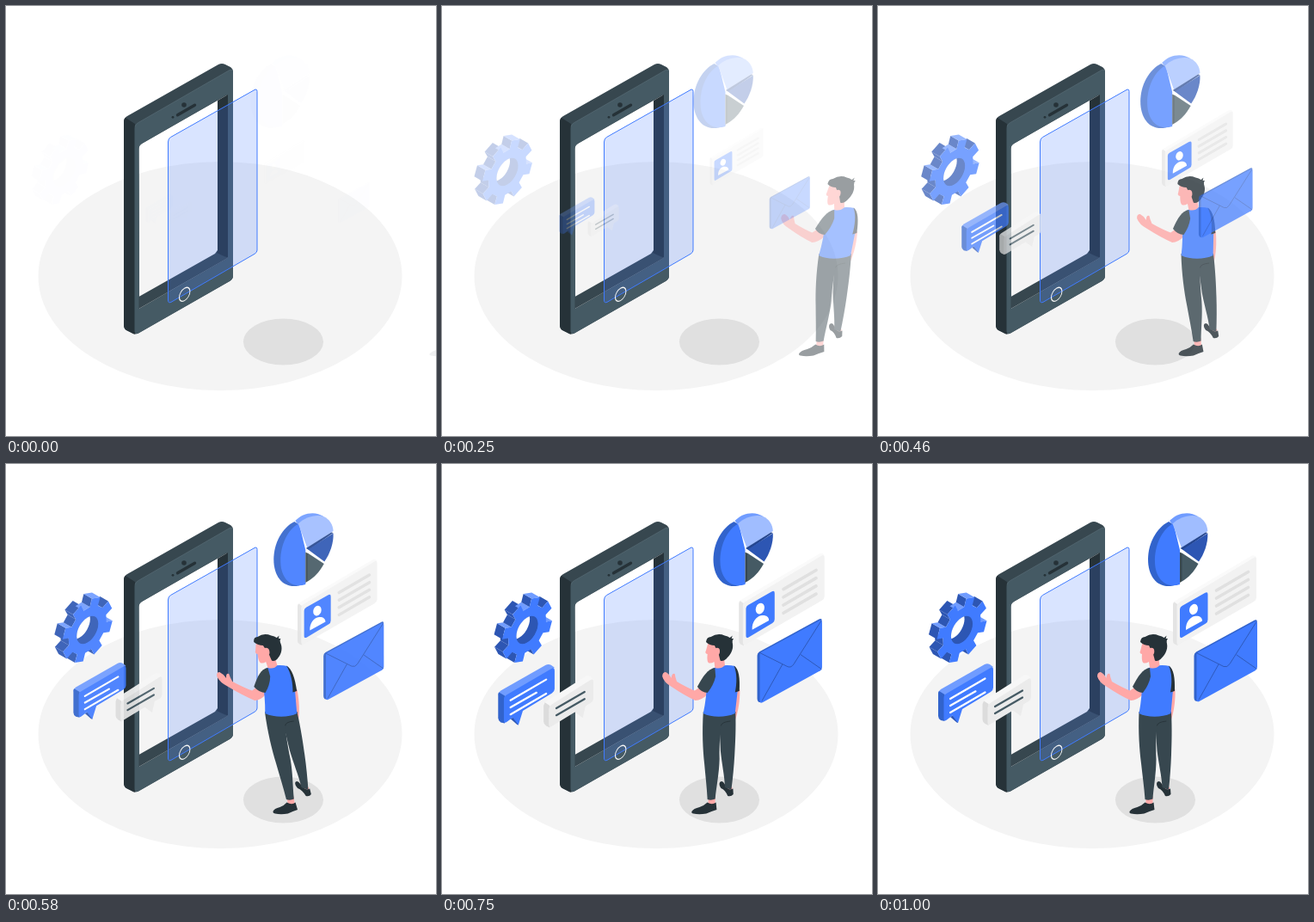
An HTML page that plays this animation: 500x500 px, repeating every 1.04 s.

```html
<!DOCTYPE html>
<html lang="en">
<head>
<meta charset="utf-8">
<title>Phone app scene</title>
<style>
  html, body { margin: 0; height: 100%; overflow: hidden; background: #fff; }
  svg { display: block; width: 100%; height: 100%; }
  .blue { fill: #407bff; }
  .shade { fill: #3163cc; }
  .navy { fill: #2d56b3; }
  .light { fill: #709cff; }
  .ink { fill: #263238; }
  .slate { fill: #37474f; }
  .steel { fill: #455a64; }
  .skin { fill: #ffa8a7; }
  .white { fill: #fff; }
  .line { fill: none; stroke-linecap: round; stroke-linejoin: round; }
</style>
</head>
<body>
<svg viewBox="0 0 500 500">
  <defs>
    <clipPath id="bore"><circle r="14.5" transform="matrix(.866 -.5 0 1 97.5 193)"/></clipPath>
  </defs>

  <ellipse cx="249" cy="314" rx="211.5" ry="133" fill="#f4f4f4"/>
  <ellipse cx="322.5" cy="390.5" rx="46.5" ry="27" fill="#e0e0e0"/>

  <!-- phone -->
  <g fill-rule="evenodd">
    <path class="slate" d="M137 135Q137 130 141 128L247 68Q251 66 255 68L261 71Q264 73 264 77V314Q264 317.500 260 320L154 380.500Q150 382.500 147 380.500L140 377Q137 375 137 371ZM154.500 166Q154.500 162 158 160L258 103V293L155 352Z"/>
    <path class="ink" d="M137 135Q137 131 139 130L150 137V381.500Q148 381.500 147 380.500L140 377Q137 375 137 371Z"/>
    <path class="steel" d="M149.500 143Q149.500 138 154 135.500L260 74.500Q264 72.500 264 77V314Q264 317.500 260 320L154 380.500Q149.500 382.500 149.500 377ZM154.500 166Q154.500 162 158 160L255 104Q258 102 258 106V293L155 352Z"/>
  </g>
  <path class="line" d="M150 140Q151 137 154 135.500L260 74.500L263 74" stroke="#5b6f79" stroke-width=".6"/>
  <path class="slate" d="M154.500 338L243 288L246 284L258 293L154.500 352Z"/>
  <path class="ink" d="M246 110L258 103V293L245 287Q246 286 246 284Z"/>
  <circle class="ink" cx="207" cy="115" r="2.8"/>
  <circle class="ink" cx="194" cy="129.300" r="1.4"/>
  <path class="line" d="M199.500 126.800L219.500 115.200" stroke="#263238" stroke-width="3.4"/>
  <path d="M188.500 158Q188.500 154.500 191.500 152.500L289 97.500Q292 96 292 99.500V284Q292 286.500 289 288.300L192 344.300Q188.500 346 188.500 342Z" fill="#407bff" fill-opacity=".2" stroke="#407bff"/>
  <circle class="line" r="7.200" transform="matrix(.866 -.5 0 1 207.700 335.300)" stroke="#f5f5f5" stroke-width="1.200"/>

  <!-- chat bubbles and contact card -->
  <g id="panels">
    <path class="light" d="M70 267Q70 264 73 262L124 233Q127 231.500 130 233L134 236L77 270Z"/>
    <path class="shade" d="M70 267Q70 265 71 264L77.500 268V299L73 298Q70 296 70 293Z"/>
    <path class="navy" d="M84 294L91.500 300.500L93 301L92 290Z"/>
    <path class="blue" d="M76.500 272Q76.500 268.500 79.500 267L130 237.500Q134 235 134 239V260Q134 263 131 265L98 285L93 301L86.500 292.500L80 297.500Q76.500 300 76.500 296Z"/>
    <path class="line" d="M84 273L124.500 249.500M84 281L113.500 264.300M84 289L124.500 265.500" stroke="#fff" stroke-width="2.200"/>

    <path fill="#f7f7f7" d="M121.500 279Q121.500 276 124 274.500L169 246Q172 244 175 246L178 249L128 282Z"/>
    <path fill="#dcdcdc" d="M121.500 279L123 275.500L128.500 279V304L124.500 302Q121.500 300 121.500 297Z"/>
    <path fill="#ebebeb" d="M127.500 283Q127.500 280 130.500 278L174.500 250Q178 248 178 252V271Q178 274 175 276L169 279.500L166 293L157 286.500L131.500 302Q127.500 305 127.500 301Z"/>
    <path class="line" d="M136 282L168 263.500M136 290L168 271.500" stroke="#455a64" stroke-width="2.200"/>

    <path fill="#e4e4e4" d="M343 163Q343 161 345 160L348.500 162V211L345 209.500Q343 208 343 206Z"/>
    <path fill="#fafafa" d="M344 160L434 107Q437 105 440 108L348 163Z"/>
    <path fill="#f2f2f2" d="M347.500 165Q347.500 163 349.500 161.500L437 109Q440 107 440 111V155Q440 158 437 160L351 209.500Q347.500 211 347.500 208Z"/>
    <path class="blue" d="M351 169Q351 166.500 353.500 165L380 150Q383.500 148 383.500 151.500V181Q383.500 184 381 185.500L354 201.500Q351 203 351 200Z"/>
    <ellipse class="white" rx="4.800" ry="6.300" transform="translate(367 169) rotate(20)"/>
    <path class="white" d="M358 193C357.500 184 363 178 368 177C373 176 377 178 377 182.500Z"/>
    <path class="line" d="M393.500 147L430.500 125.500M393.500 156L430.500 134.500M393.500 165L430.500 143.500M393.500 174L430.500 152.500" stroke="#e0e0e0" stroke-width="3.600"/>
  </g>

  <!-- pie chart -->
  <g id="pie">
    <path class="shade" d="M338 67C324 74 314 92 314 111C314 132 326 145 343 141.500L351 139L343 70Z"/>
    <path class="blue" d="M343.500 69C330 76 321.500 95 322 114C322.500 135 336 145 351 140V100Z"/>
    <path class="light" d="M339 66C347 57 362 54 372 61L360 66L342 70Z"/>
    <path fill="#a0bdff" d="M342.500 69.500C350 62 363 58 372 61C379 64 383 71 383.300 78L353 97.500Z"/>
    <path fill="#244690" d="M351.500 98L381 79.500L383.300 80L355 100Z"/>
    <path class="navy" d="M354 99.500L383.300 80.500C384 92 379 105 373 113.500Z"/>
    <path class="slate" d="M351 102.500L354 104V136L351 138Z"/>
    <path class="steel" d="M353.500 103.500L372.500 116C367 126 361 132 353.500 136.500Z"/>
  </g>

  <g id="gear">
    <g id="teeth"></g>
    <g clip-path="url(#bore)">
      <circle class="navy" r="15" transform="matrix(.866 -.5 0 1 97.5 193)"/>
      <circle class="white" r="14.500" transform="matrix(.866 -.5 0 1 88 187.5)"/>
    </g>
  </g>

  <g id="man">
    <path class="skin" d="M340 262L345.500 262C346 275 344 288 341 297L338 294Z"/>
    <path class="skin" d="M328 372L334 373L339 376L339 381L332 381Z"/>
    <path class="ink" d="M324.500 370Q327.500 367 330 372Q333 378 337 378.500L340 377.500L340.500 384Q338 387 334 386Q331 379 326 377Q323 373 324.500 370Z"/>
    <path class="slate" d="M322 295L341 288C342 308 341.500 325 341 338C340.500 352 339.500 365 338 379L330.500 376C330 363 326 347 324.500 333Z"/>
    <path class="skin" d="M311.500 386H319.500V396H311.500Z"/>
    <path class="ink" d="M292.500 404Q294.500 400.500 301.500 399Q307 397 310.500 393.500Q316 397 320.500 393.500L321.500 402Q315 404 309.500 406.500Q301 408 294.500 406.500Q292 406 292.500 404Z"/>
    <path class="slate" d="M303.500 288C302.500 312 304 332 306 348C307.500 362 309.500 376 310.500 390Q315 391.500 319.500 389.500C320.500 375 323.500 360 323.500 343C323 327 323.500 312 324.500 303L340 298L341 288Z"/>
    <path class="line" d="M324.500 304Q325 300 335 299" stroke="#263238" stroke-width=".8"/>

    <path class="skin" d="M301 258L309 267Q301 275 294 275Q281 269 266 259Q257 254 255 247Q255 242 259 242Q263 244 265.500 249Q266 243 269.500 244Q270 248 272 253Q284 260 293 263.500Z"/>
    <path class="blue" d="M313 238C320 234 331 233 339 235C344 241 344 253 343 263L340.500 290C330 295 313 295 303.500 290C306 277 307 265 307 254Z"/>
    <path class="slate" d="M316 237C308 238 302 247 296 259Q301 266 308 266Q315 257 317 247Z"/>
    <path class="ink" d="M338 234.500C344 238 345.500 249 345 264L340 265.500C342 255 342 243 338 234.500Z"/>

    <path class="skin" d="M308 207C306 212 306 215 304.500 219Q305 221 307 221C306.500 226 307 231 309 231.500Q312 232 315 230L316 237Q323 239 327.500 234L326 222L325 208Z"/>
    <path class="ink" d="M305 207Q305.500 201 310.500 201Q318.500 196 326.500 199.500Q330.500 200 332.500 202Q334 201 335.500 199.500Q335 202 334.500 203L337 203Q335 205 336 209C337.500 216 333 223 328.500 227Q325 230 322 228.500L320 221L315 211Q309 211 305 207Z"/>
    <ellipse class="skin" cx="318" cy="218" rx="3.300" ry="4.200"/>
  </g>

  <g id="mail">
    <path class="shade" d="M367.500 223Q367.500 220 370 218.500L438 181.500Q440 180.500 441 182.500L371.500 221V276L369 275.500Q367.500 274 367.500 272Z"/>
    <path class="blue" d="M370.500 222Q370.500 220 372 219L438.500 183Q441 182 441 185V236Q441 238.500 439 240L373.500 276Q370.500 277.500 370.500 274Z"/>
    <path class="line" d="M371 220L402 235.500Q406 237 409 232.500L440 183.500M373 274L396 233M440 238L417 222" stroke="#2d56b3" stroke-width=".9"/>
  </g>
</svg>
<script>
const $ = id => document.getElementById(id);
const LOOP = 1040, STEPS = 25;

function drawGear() {
  const depth = [-9.500, -5.500], pts = [];
  const add = (r, deg) => {
    const a = deg * Math.PI / 180, u = r * Math.cos(a), v = r * Math.sin(a);
    pts.push([97.500 + .866 * u, 193 + v - .5 * u]);
  };
  for (let a = 20; a < 380; a += 45) {
    add(25.500, a - 13); add(34, a - 10); add(34, a + 10); add(25.500, a + 13);
  }
  let out = '';
  pts.forEach(([x, y], i) => {
    const [x2, y2] = pts[(i + 1) % pts.length], dx = x2 - x, dy = y2 - y;
    if (dy * depth[0] - dx * depth[1] <= 0) return;   // side faces away
    const tone = dx > -dy ? 'light' : 'navy';
    const quad = [x, y, x2, y2, x2 + depth[0], y2 + depth[1], x + depth[0], y + depth[1]];
    out += `<polygon class="${tone}" points="${quad}"/>`;
  });
  $('teeth').innerHTML = out + `<polygon class="blue" points="${pts.join(' ')}"/>`;
}

// cubic-bezier(.36, -.01, .5, 1.38): overshoots, then settles
function ease(x) {
  if (x >= 1) return 1;
  const curve = (s, a, b) => 3 * (1 - s) ** 2 * s * a + 3 * (1 - s) * s * s * b + s ** 3;
  let lo = 0, hi = 1;
  for (let i = 0; i < 24; i++) {
    const mid = (lo + hi) / 2;
    if (curve(mid, .36, .5) < x) lo = mid; else hi = mid;
  }
  return curve(lo, -.01, 1.38);
}

function pose(id, opacity, transform) {
  $(id).setAttribute('opacity', Math.min(1, Math.max(0, opacity)));
  $(id).setAttribute('transform', transform);
}

const around = (x, y, change) => `translate(${x} ${y}) ${change} translate(${-x} ${-y})`;

function lean(t) {
  if (t < .6) return -20 + 50 * t;
  if (t < .8) return 10 - 70 * (t - .6);
  return -4 + 20 * (t - .8);
}

function draw(now) {
  // stepped motion; the small bias absorbs rounding of the step times
  const step = Math.floor((now % LOOP) / LOOP * STEPS + .1);
  const t = Math.min(1, (step + 1) / STEPS);
  const p = ease(t), zoom = `scale(${.5 + .5 * p})`, slide = `translate(${30 * (p - 1)} 0)`;
  const entry = Math.min(1, t / .6);
  pose('pie', p, slide);
  pose('gear', p, slide);
  pose('panels', p, around(255, 204.500, zoom));
  pose('mail', p, around(404.300, 228.500, zoom));
  pose('man', entry, `translate(${250 * (1 - entry)} 0) ` + around(300, 302.500, `skewX(${lean(t)})`));
}

drawGear();
const start = performance.now();
(function tick() {
  draw(performance.now() - start);
  requestAnimationFrame(tick);
})();
</script>
</body>
</html>
```
